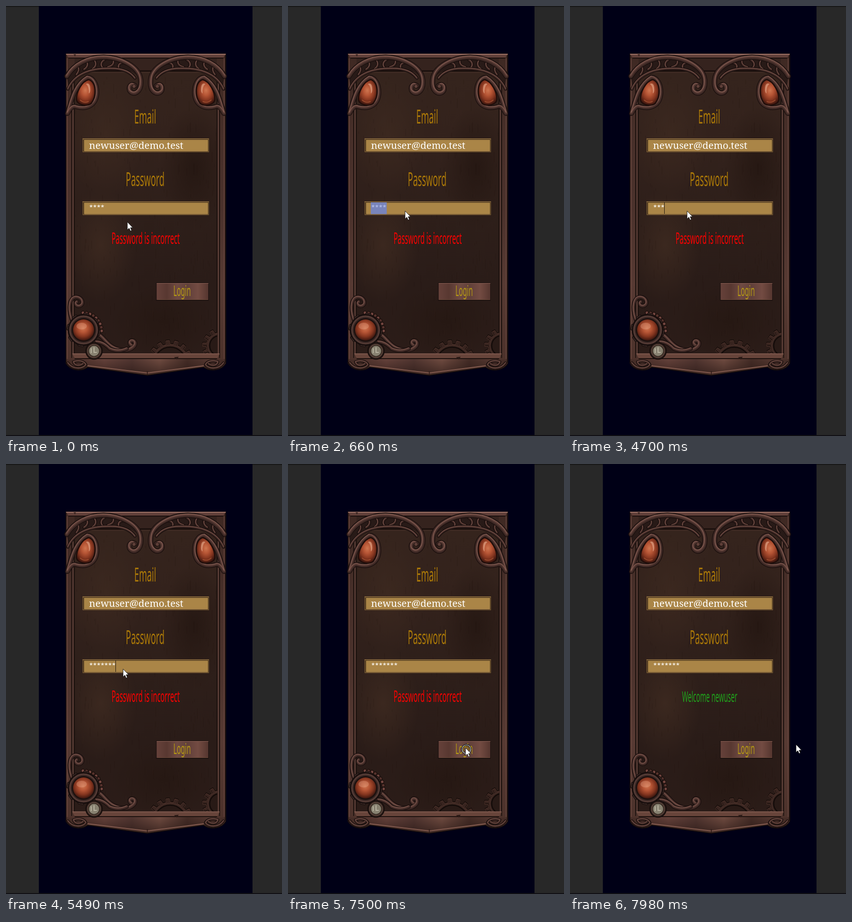
An HTML page for the animation above (8000 ms loop, 580 px wide and 900 px high).

```html
<!DOCTYPE html>
<html lang="en">
<head>
<meta charset="utf-8">
<title>Login</title>
<style>
  html, body { margin: 0; width: 100%; height: 100%; overflow: hidden; background: #000016; }
  svg { display: block; width: 580px; height: 900px; }
  .display { font-family: "Noto Sans", sans-serif; font-weight: 500; text-anchor: middle; }
  .email { font: 20.5px "Noto Serif", serif; fill: #fff; }
  .stars { font: 13.25px "Noto Sans Mono", monospace; white-space: pre; }
</style>
</head>
<body>
<svg id="stage" viewBox="0 0 580 900" xmlns="http://www.w3.org/2000/svg"></svg>
<script>
const CONDENSE = 0.45; // shared width of the display face
const LOOP = 8000;

let seed = 7;
const rnd = () => (seed = seed * 16807 % 2147483647) / 2147483647;

const rect = (x, y, w, h, fill, extra = "") =>
  `<rect x="${x}" y="${y}" width="${w}" height="${h}" fill="${fill}" ${extra}/>`;
const line = (d, color, w = 1, extra = "") =>
  `<path d="${d}" fill="none" stroke="${color}" stroke-width="${w}" stroke-linecap="round" ${extra}/>`;
const shape = (d, fill, extra = "") => `<path d="${d}" fill="${fill}" ${extra}/>`;
const disc = (x, y, r, fill, extra = "") => `<circle cx="${x}" cy="${y}" r="${r}" fill="${fill}" ${extra}/>`;
const glow = (x, y, rx, ry, fill) => `<ellipse cx="${x}" cy="${y}" rx="${rx}" ry="${ry}" fill="url(#${fill})"/>`;
const label = (x, y, size, fill, text, id = "") =>
  `<text class="display" ${id && `id="${id}"`} transform="translate(${x} ${y}) scale(${CONDENSE} 1)" font-size="${size}" fill="${fill}">${text}</text>`;
const stops = colors =>
  colors.map((c, i) => `<stop offset="${i / (colors.length - 1)}" stop-color="${c}"/>`).join("");
const gradient = (id, dir, ...colors) =>
  `<linearGradient id="${id}" ${dir === "v" ? 'x2="0" y2="1"' : ""}>${stops(colors)}</linearGradient>`;
const radial = (id, ...colors) =>
  `<radialGradient id="${id}" cx=".48" cy=".42" r=".6">${stops(colors)}</radialGradient>`;
const soft = (id, color) =>
  `<radialGradient id="${id}"><stop stop-color="${color}"/><stop offset="1" stop-color="${color}" stop-opacity="0"/></radialGradient>`;

// A rounded bar of copper: dark rim, body, lit edge
const metal = (d, w) =>
  line(d, "#170d0c", w + 2.4) + line(d, "#3d2824", w) +
  line(d, "#573a34", w * 0.5, 'transform="translate(-.5 -.9)"') +
  line(d, "#8b6257", Math.max(0.7, w * 0.14), `transform="translate(${-w * 0.12} ${-w * 0.27})"`);

function gear(cx, cy, r, teeth) {
  let d = "";
  for (let i = 0; i < teeth; i++) {
    [[0, 0], [0.45, 0], [0.52, 8], [0.9, 8]].forEach(([f, out]) => {
      const a = (i + f) / teeth * 2 * Math.PI;
      d += `${d ? "L" : "M"}${(cx + Math.cos(a) * (r + out)).toFixed(1)} ${(cy + Math.sin(a) * (r + out)).toFixed(1)}`;
    });
  }
  return shape(d + "Z", "#38241f", 'stroke="#130b09" stroke-width="2"') +
    line(d + "Z", "#6a463c", 0.8, 'transform="translate(0 1)"') +
    disc(cx, cy, r - 7, "#281a16", 'stroke="#130b09" stroke-width="2.5"') +
    disc(cx, cy, r - 3, "none", 'stroke="#4d342d"');
}

function grain() {
  let dark = "", light = "";
  for (let i = 0; i < 420; i++) {
    const x = 146 + rnd() * 297, y = 140 + rnd() * 570, h = 3 + rnd() * 18;
    const d = `M${x.toFixed(1)} ${y.toFixed(1)}v${Math.min(h, 726 - y).toFixed(1)}`;
    if (rnd() < 0.55) dark += d; else light += d;
  }
  return glow(200, 500, 75, 120, "pale") + glow(210, 270, 80, 130, "pale") +
    glow(395, 340, 70, 130, "shade") + glow(330, 660, 110, 80, "shade") +
    line(dark, "#211511", 1, 'opacity=".22"') + line(light, "#493129", 1, 'opacity=".13"');
}

function corner() {
  const leaves = ["M148 144C153 138 155 131 150 126", "M164 133C171 129 174 122 169 116",
    "M181 133C189 128 191 121 186 114", "M203 129C198 124 200 117 207 113",
    "M214 128C223 126 227 121 226 115", "M237 130C235 124 239 120 245 119"];
  const cup = "M129 225C139 190 146 164 171 149C184 150 191 164 191 181C190 208 170 217 148 211C140 207 134 216 130 224";
  return shape("M128 150C150 112 190 104 235 111Q274 122 280 148Q250 126 213 129Q154 132 132 172Z", "#281a17") +
    leaves.map(d => metal(d, 3.5)).join("") +
    metal("M130 174C145 140 182 130 220 131C248 131 262 139 271 151", 4) +
    metal("M128 147C142 122 172 107 205 107C245 108 280 128 283 154C286 180 268 189 260 177C257 167 264 161 271 167", 8.5) +
    disc(269, 168, 4, "#5d3e37", 'stroke="#1b100e"') +
    metal(cup, 7.5) +
    shape("M174 154C191 160 190 190 179 204C169 211 149 207 148 196C148 181 158 158 174 154Z", "url(#gem)", 'stroke="#1e0d0a" stroke-width="2.5"') +
    shape("M168 163Q176 160 177 171Q178 181 174 183Q175 169 168 163Z", "#eab092", 'opacity=".6"') +
    line("M156 197Q164 204 173 200", "#e0794a", 2, 'opacity=".4"');
}

function medallion() {
  let beads = "";
  for (let i = 0; i < 9; i++) {
    const a = (-92 + i * 11.5) * Math.PI / 180;
    beads += disc(163 + 38 * Math.cos(a), 680 + 38 * Math.sin(a), 3.4, i % 2 ? "#55322c" : "#744740", 'stroke="#1c100d" stroke-width="1.5"');
  }
  let bolts = "";
  for (let i = 0; i < 8; i++)
    bolts += rect(157, 643, 12, 9, "#4b3631", `rx="2" stroke="#1a100f" stroke-width="1.5" transform="rotate(${i * 45 + 10} 163 678)"`);
  return metal("M138 656C129 630 134 609 148 609C163 610 165 628 152 628C146 627 145 621 149 619", 6) +
    metal("M188 684C209 692 211 713 238 719C264 725 278 707 268 701C260 698 257 707 264 710", 7) +
    metal("M174 708C190 697 207 705 218 717C231 723 243 722 254 717", 6) +
    beads + bolts +
    disc(163, 678, 32, "#3a2825", 'stroke="#150c0b" stroke-width="2.5"') +
    disc(163, 678, 28.5, "none", 'stroke="#5c4039" stroke-width="2"') +
    disc(163, 678, 25, "#1d110f") +
    disc(163, 678, 22, "url(#gem)") +
    `<ellipse cx="159" cy="670" rx="11" ry="7" fill="#e8a88c" opacity=".35"/>` +
    disc(185, 722, 17, "#3b2924", 'stroke="#170e0c" stroke-width="2.5"') +
    disc(185, 722, 14, "#5c483e") +
    disc(185, 722, 11.5, "#878170", 'stroke="#2b1f18" stroke-width="1.5"') +
    line("M179 717v9M185 715v10h5", "#b6b19e", 2);
}

const rail = x =>
  rect(x, 108, 18, 632, "url(#rail)") + rect(x + 12, 137, 6, 593, "#3a2621") +
  line(`M${x + 0.5} 104V746`, "#1e1210", 1) + line(`M${x + 2.5} 110V738`, "#6c4840", 1.5) +
  line(`M${x + 12} 140V736`, "#1d120f", 1.8) + line(`M${x + 14.8} 140V730`, "#684840", 1.6) +
  line(`M${x + 17.6} 140V728`, "#19100d", 1.8);

const field = y =>
  rect(161, y, 265.5, 28.5, "#7e6037") + rect(162.5, y + 1.5, 262.5, 25.5, "#2b1c11") +
  rect(164, y + 2.5, 261, 24, "#aa8547") +
  line(`M161 ${y + 0.5}h265M165 ${y + 26}h259`, "#b18b52", 0.8) +
  line(`M163.5 ${y + 2}v25M425 ${y + 2}v25`, "#3d2a18", 1);

const mirror = 'transform="translate(587 0) scale(-1 1)"';
const outline = "M126 100H462V748C454 762 432 767 415 756L297 773L172 756C155 767 134 762 126 748Z";
const curlPath = "M130 747C141 763 163 760 168 751C165 743 151 741 142 745C144 754 155 754 162 749";
const curl = metal(curlPath, 3.5);

stage.innerHTML = `<defs>
    ${gradient("panel", "v", "#35241d", "#33221c", "#2e1f1a", "#2a1c18", "#2b1c18")}
    ${gradient("rail", "v", "#3f2923", "#472f29", "#4b322c", "#573a33", "#4c322b")}
    ${gradient("bar", "h", "#4b302a", "#64413a", "#503530", "#6f4b40", "#442c26", "#593b33")}
    ${gradient("barShade", "v", "#20121000", "#20121088")}
    ${gradient("button", "h", "#66413a", "#583831", "#6f4a42", "#61403a", "#734b42", "#55362f")}
    ${radial("gem", "#cf7650", "#b65535", "#84351f", "#35130d")}
    ${soft("pale", "#3b281f")}${soft("shade", "#261813")}
    <clipPath id="inside">${rect(144, 140, 300, 588, "#000")}</clipPath>
  </defs>` +
  rect(0, 0, 580, 900, "#282828") + rect(69, 0, 449, 900, "#000016") +
  rect(0, 0, 69, 2, "#171717") + rect(518, 0, 62, 2, "#171717") + rect(0, 898, 580, 2, "#111014") +
  shape(outline, "#452d27", 'stroke="#160d0b" stroke-width="1.5"') +
  rect(138, 136, 312, 594, "url(#panel)") + `<g clip-path="url(#inside)">${grain()}</g>` +
  rect(127, 108, 334, 28, "#35231e") + line("M128 136H460", "#170d0b", 2.5) + line("M144 139H444", "#4b322b", 1) +
  rail(126) + `<g ${mirror}>${rail(126)}</g>` +
  shape("M126 100H462L456 109H132Z", "#61403a") + line("M127 101H461", "#9b7065", 1.8) + line("M132 109H456", "#1b100e", 2) +
  shape("M142 101h5l-2 5z", "#392520") +
  `<g clip-path="url(#inside)">${gear(345, 747, 40, 16)}${gear(449, 711, 28, 13)}</g>` +
  shape("M139 728H449L444 738H145Z", "#68453b") + line("M140 728H448", "#8a6255", 1.5) + line("M145 738H443", "#1d110e", 2) +
  ["bar", "barShade"].map(fill => shape("M149 739H439L415 752L297 769L172 752Z", `url(#${fill})`)).join("") +
  line("M172 753L297 768L415 753", "#845b4f", 1.8) + line("M297 765V772", "#2a1814", 1.5) +
  shape("M353 735l10-1l-4 6z", "#2b1a16") + curl + `<g ${mirror}>${curl}</g>` +
  corner() + `<g ${mirror}>${corner()}</g>` + medallion() +
  label(292.5, 246, 40, "#aa7808", "Email") + label(292.5, 377, 40, "#aa7808", "Password") +
  field(277.5) + field(409) +
  `<text class="email" x="174.5" y="299">newuser@demo.test</text>` +
  rect(315, 579, 111, 38, "#1d1210") + rect(316.5, 580.5, 108.5, 34.5, "url(#button)") +
  line("M317 580.5H425", "#8f6357", 1.2) + line("M318 614.5H424", "#76523f", 0.8) +
  label(370, 607, 31, "#b69b13", "Login") +
  label(293.5, 498, 32, "#f00", "", "message") +
  rect(174, 411, 33.5, 24.5, "#7984bb", 'id="selection"') +
  `<text class="stars" id="stars" x="174.8" y="425.5" stroke-width=".2"></text>` +
  rect(0, 411, 1, 24, "#21180e", 'id="caret"') +
  `<g id="ring">${disc(2, 3, 9, "none", 'stroke="#111" stroke-width="3.4"')}${disc(2, 3, 9, "none", 'stroke="#eee" stroke-width="1.2"')}</g>` +
  shape("M0 0V16.5L3.8 13L6.4 19L9 17.9L6.5 12H11.5Z", "#fff", 'id="cursor" stroke="#111" stroke-width=".9"');

// Pointer keys: time, x, y
const path = [[0, 255, 452], [360, 245.5, 429], [6420, 245.5, 429], [6600, 301, 447], [6780, 378.5, 483],
  [6900, 407, 525], [7020, 394, 573], [7140, 373, 594], [7560, 373, 594], [7740, 415, 592], [7980, 475, 587]];
const typed = [3340, 4460, 4700, 4820, 5120, 5370, 5490];
const within = (t, a, b) => t >= a && t < b;
const show = (el, on) => el.setAttribute("visibility", on ? "visible" : "hidden");
const set = (el, text) => { if (el.textContent !== text) el.textContent = text; };

function pointer(t) {
  t = Math.floor(t / 60) * 60; // the pointer moves in 60 ms hops
  const i = path.findIndex(k => k[0] > t);
  if (i < 0) return path.at(-1).slice(1);
  const [a, b] = [path[i - 1], path[i]], f = (t - a[0]) / (b[0] - a[0]);
  return [1, 2].map(n => Math.round(a[n] + (b[n] - a[n]) * f));
}

const [message, selection, stars, caret, ring, cursor] =
  ["message", "selection", "stars", "caret", "ring", "cursor"].map(id => document.getElementById(id));

function draw(now) {
  const t = now % LOOP;
  const count = typed.filter(k => t >= k).length;
  const selected = within(t, 540, typed[0]);
  const welcome = t >= 7680;
  const move = `translate(${pointer(t).join(" ")})`;

  cursor.setAttribute("transform", move);
  ring.setAttribute("transform", move);
  show(ring, within(t, 540, 660) || within(t, 7500, 7620));
  show(selection, selected);
  show(caret, within(t, typed[0], 7500));
  caret.setAttribute("x", Math.round(174.3 + 7.95 * count));
  caret.setAttribute("opacity", count === 1 ? 0.45 : 1);
  set(stars, "*".repeat(count || 4));
  stars.setAttribute("fill", selected ? "#b9c4ee" : "#fff");
  stars.setAttribute("stroke", selected ? "#b9c4ee" : "#fff");
  set(message, welcome ? "Welcome newuser" : "Password is incorrect");
  message.setAttribute("fill", welcome ? "#20a31c" : "#f00");
  message.setAttribute("font-size", welcome ? 30 : 32);
  requestAnimationFrame(draw);
}
draw(performance.now());
</script>
</body>
</html>
```
